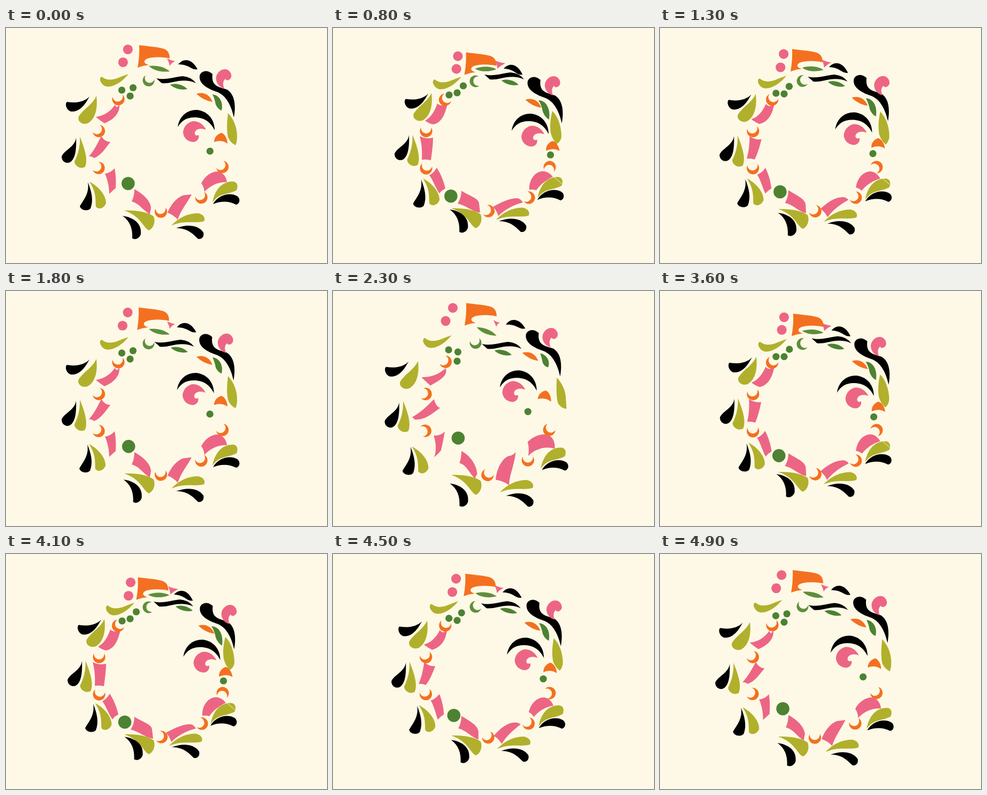
Animation of 600 by 439 pixels, one loop 5 s. Source, as an HTML page with a canvas:

```html
<!DOCTYPE html>
<html lang="en">
<head>
<meta charset="utf-8">
<title>Floral wreath</title>
<style>
html, body { margin: 0; width: 100%; height: 100%; overflow: hidden; background: #fef9e6; }
canvas { display: block; width: 600px; height: 439px; }
</style>
</head>
<body>
<canvas id="stage" width="600" height="439"></canvas>
<script>
const ctx = document.getElementById('stage').getContext('2d');
const CREAM = '#fef9e6', PINK = '#ed6585', ORANGE = '#f47020', BLACK = '#000', OLIVE = '#b1b02c', GREEN = '#4d8232', FERN = '#5e8e3b';
const LOOP = 5000, STEP = 100;
const MOVE = 1290, REST = 295, PAUSE = 180, CYCLE = 2 * MOVE + REST + PAUSE, LEAD = 750;
const DRAWN_AT = 1 - (CYCLE - LEAD - REST - MOVE - PAUSE) / MOVE; // openness at which the shapes are laid out
const RAD = Math.PI / 180;
const pieces = [];

// close: shift and turn when the wreath is shut; drift: extra shift gained while it rests shut
function add(color, path, close, { turn = 0, pivot = [0, 0], drift = [0, 0] } = {}) {
  pieces.push({ color, path: typeof path === 'function' ? path : () => path, close, turn, pivot, drift });
}
const shape = (color, d, close, opts) => add(color, new Path2D(d + 'Z'), close, opts);

// Outline that bends from its open form to its shut form
function morph(color, open, shut, opts) {
  const ends = shut.match(/[\d.]+/g);
  const path = k => {
    let i = 0;
    return new Path2D(open.replace(/[\d.]+/g, v => +v + (ends[i++] - v) * k) + 'Z');
  };
  add(color, path, [0, 0], opts);
}

function dot(color, x, y, r, close, drift) {
  const p = new Path2D();
  p.arc(x, y, r, 0, 7);
  add(color, p, close, { drift });
}

function crescent(color, x, y, dir, turn, close, R = 11.6) {
  const r = R * 0.82, d = R * 0.44;
  const tx = (R * R - r * r + d * d) / (2 * d), ty = Math.sqrt(R * R - tx * tx);
  const a = Math.atan2(ty, tx), b = Math.atan2(ty, tx - d);
  const moon = new Path2D(), p = new Path2D();
  moon.arc(0, 0, R, a, 2 * Math.PI - a);
  moon.arc(d, 0, r, -b, b, true);
  moon.closePath();
  p.addPath(moon, new DOMMatrix().translate(x, y).rotate(dir));
  add(color, p, close, { turn, pivot: [x, y] });
}

// Crown
dot(PINK, 227.8, 40, 9.1, [5.7, 12.5], [-0.5, 0.5]);
dot(PINK, 218.8, 64, 9.1, [12.2, 12], [-2, 2]);
morph(PINK, 'M301 57Q309 61 316 62Q309 65 306 71Q305 64 301 57', 'M303 61Q313 65 322 66Q314 70 307 76Q307 68 303 61', { drift: [0, -0.5] });
shape(ORANGE, 'M249 32C262 34 280 35 292 38C302 40 306 47 306 57C296 54 270 53 261 59C257 62 258 67 267 69Q256 70 246 74Q250 52 249 32', [0, 14], { drift: [-2.5, -2.5] });
shape(BLACK, 'M322 68C331 56 347 56 358 77C345 79 344 68 322 68', [-2, 9], { turn: 4, pivot: [340, 68], drift: [-6, 0] });
shape(FERN, 'M267 71C280 69 296 72 306 81C292 83 276 80 267 71', [-1, 0.5], { turn: -13, pivot: [286, 76.5] });
shape(BLACK, 'M281 94C300 98 315 91 330 90Q346 91 355 103C340 96 325 98 312 101Q300 104 291 103', [3.5, -7.5], { drift: [-8.5, 2.5] });
shape(GREEN, 'M307 106C318 102 331 106 339 114C327 117 315 113 307 106', [7.5, -8], { drift: [2.5, 0] });
crescent(FERN, 266.5, 98, -66, 62, [0, 1.5], 11);
dot(GREEN, 216.5, 116, 6.6, [0.5, 9]);
dot(GREEN, 237.5, 111.5, 6.6, [6, -3.5]);
dot(GREEN, 232, 127, 6.6, [0, -6]);

// Ring segments
morph(PINK, 'M168 166C184 164 196 155 204 143Q206 152 212 143C213 157 204 170 184 178Q176 173 168 166', 'M172 173C182 168 190 156 195 141Q203 148 214 142C210 158 204 178 187 180Q180 179 172 173');
morph(PINK, 'M178 202Q185 213 195 213C186 224 179 237 165 243Q159 239 155 240C165 228 170 218 178 202', 'M162 202Q174 208 187 205C187 218 185 232 183 247Q175 245 166 246C167 230 166 217 162 202');
morph(PINK, 'M203 262Q195 271 185 272C190 283 193 298 193 310Q199 304 205 299C206 285 205 273 203 262', 'M194 261Q188 271 180 275C187 284 191 298 199 309Q203 303 210 300C207 286 202 274 194 261');
morph(PINK, 'M240 301C256 310 270 322 271 336L269 348C256 341 250 328 235 324Q240 314 240 301', 'M240 304C255 314 273 318 273 328L275 345C258 342 250 332 233 328Q240 317 240 304');
morph(PINK, 'M347 311C337 329 327 340 321 358Q313 349 302 345C310 325 325 312 336 312Q342 311 347 311', 'M355 326C335 331 322 339 309 351Q306 341 299 334C315 325 330 318 344 318Q350 318 355 326');
morph(PINK, 'M365 290C372 276 384 268 396 268C405 269 412 278 413 288C397 287 382 294 371 306Q370 296 365 290', 'M367 302C366 285 376 270 389 268C398 266 406 272 411 278C398 284 388 292 380 303Q374 301 367 302');
crescent(ORANGE, 210, 133, -103, 62, [-0.5, 1]);
crescent(ORANGE, 173.5, 192.5, -135, 45, [0.5, 0]);
crescent(ORANGE, 173, 261.5, -145, 72, [1, 0.5]);
crescent(ORANGE, 289.5, 343, -97, -60, [1, -1]);
crescent(ORANGE, 365, 316.5, -118, -42, [1, 0.5]);
crescent(ORANGE, 404.5, 259.5, -135, -123, [0.5, 0.5]);
dot(GREEN, 228.3, 290.5, 12.3, [-8.3, 23.5], [2, 0]);

// Outer petals
shape(OLIVE, 'M229 86C212 91 194 104 179 91C173 93 176 103 184 108C197 114 217 101 229 86', [11, 5]);
shape(BLACK, 'M156 128C147 138 130 141 114 138C109 142 114 155 122 156C138 157 148 143 156 128', [22, -5.5]);
shape(OLIVE, 'M169 127C162 143 146 150 136 165C132 174 143 182 153 178C167 170 172 150 169 127', [15, -5.5]);
shape(BLACK, 'M131 205C129 222 109 228 104 240C104 249 112 254 119 251C130 246 132 225 131 205', [11, -5]);
shape(OLIVE, 'M138 203C139 222 134 238 128 249C128 258 140 265 148 259C154 245 146 222 138 203', [10.5, -3.5]);
shape(OLIVE, 'M156 287C168 293 187 309 187 327C184 337 173 340 168 334C167 318 169 308 156 287', [12.5, -5.5], { drift: [-2, -3] });
shape(BLACK, 'M153 288C156 308 147 318 138 333C140 341 153 343 158 337C164 322 160 305 153 288', [12, -4.5], { drift: [-2, -3.5] });
shape(OLIVE, 'M221 341C242 340 264 343 276 352C280 362 276 374 267 378C256 373 252 351 221 341', [0, -4]);
shape(BLACK, 'M218 351C240 354 254 366 252 385C249 394 241 396 236 393C237 375 232 361 218 351', [-0.5, -12.5], { drift: [4, 3] });
shape(OLIVE, 'M309 369C322 355 340 346 358 346C368 347 374 355 370 361C352 366 336 358 309 369', [-4.5, -10.5]);
shape(BLACK, 'M318 374C338 366 360 368 369 382C371 391 365 395 359 394C347 382 338 374 318 374', [-8, -13]);
shape(OLIVE, 'M386 326C390 302 405 285 426 287C433 289 434 296 431 303C415 312 399 307 386 326', [-3.5, -8.5]);
shape(BLACK, 'M387 329C396 312 418 306 432 314C439 319 437 329 430 330C416 323 402 323 387 329', [-5, -8]);

// Right side and swirls
dot(GREEN, 381.3, 230, 6.6, [25.2, 7]);
shape(ORANGE, 'M389 213C389 203 397 197 403 196C409 198 414 207 414 216Q403 208 389 213', [8.5, 15], { turn: -6, pivot: [402, 206] });
morph(OLIVE, 'M415 159C424 168 432 184 432 203Q432 212 429 219Q419 214 415 204C412 190 413 175 415 159', 'M410 155C421 165 427 185 427 203Q426 212 418 217Q410 208 407 196C405 183 406 170 410 155');
morph(GREEN, 'M386 124C398 125 407 138 403 154Q396 152 392 143Q390 132 386 124', 'M384 135C398 135 407 150 404 171Q396 167 392 156Q390 144 384 135');
shape(ORANGE, 'M356 123C368 119 380 123 386 138Q370 136 356 123', [3.5, 11]);
shape(BLACK, 'M386 86C375 76 364 81 362 89C360 105 378 114 396 120C412 127 421 145 426 167C430 146 428 124 413 115C398 110 383 109 386 86', [2, 11], { drift: [-1.5, 0] });
shape(PINK, 'M408 113C396 110 391 99 393 90C397 79 407 75 414 78C422 82 423 92 419 95C415 99 411 98 410 95C405 99 405 106 408 113', [2, 12], { drift: [8, 6] });
shape(BLACK, 'M321 185C324 164 339 153 356 153C374 154 390 168 390 191C381 173 368 167 352 167C338 167 328 173 321 185', [13.5, 7], { drift: [-3, 0] });
shape(PINK, 'M374 190C367 177 358 174 350 174C338 176 331 186 331 196C333 208 342 213 351 213C358 212 362 205 360 200C356 202 352 200 353 195C355 189 363 186 374 190', [21.5, 8.5], { drift: [-2, 0] });

function pose(t) {
  let u = (t - LEAD + CYCLE) % CYCLE;
  if (u < REST) return { open: 0, slide: u / REST };
  u -= REST;
  if (u < MOVE) return { open: u / MOVE, slide: 1 - u / MOVE };
  u -= MOVE + PAUSE;
  return { open: u < 0 ? 1 : 1 - u / MOVE, slide: 0 };
}

function draw(t) {
  const { open, slide } = pose(t);
  const shut = 1 - open / DRAWN_AT;
  ctx.fillStyle = CREAM;
  ctx.fillRect(0, 0, 600, 439);
  for (const { color, path, close, turn, pivot: [px, py], drift } of pieces) {
    ctx.save();
    ctx.translate(px + close[0] * shut + drift[0] * slide, py + close[1] * shut + drift[1] * slide);
    ctx.rotate(turn * shut * RAD);
    ctx.translate(-px, -py);
    ctx.fillStyle = color;
    ctx.fill(path(shut));
    ctx.restore();
  }
  // Hairline seam on the right petal while shut
  if (shut > 0.5) {
    ctx.strokeStyle = CREAM;
    ctx.lineWidth = 0.9;
    ctx.beginPath();
    ctx.moveTo(409, 275);
    ctx.lineTo(429, 292);
    ctx.stroke();
  }
}

const start = performance.now();
function tick() {
  const t = (performance.now() - start) % LOOP;
  draw(Math.floor(t / STEP) * STEP);
  requestAnimationFrame(tick);
}
tick();
</script>
</body>
</html>
```
